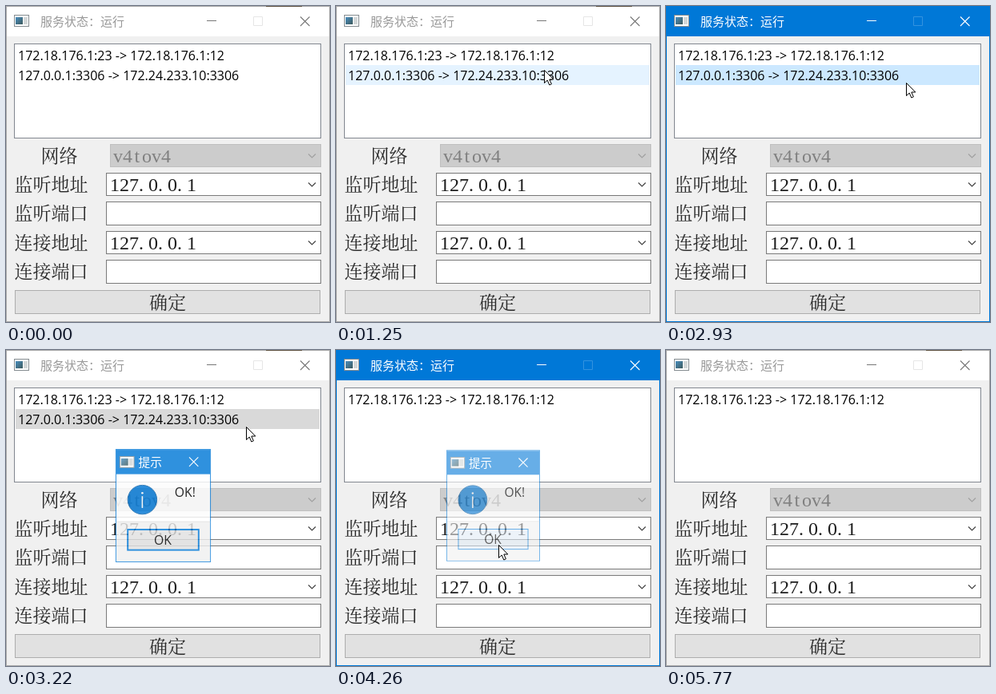
An HTML page for the animation above (5810 ms loop, 405 by 396 pixels).

```html
<!DOCTYPE html>
<html lang="zh-CN">
<head>
<meta charset="utf-8">
<title>服务状态</title>
<style>
  html, body { margin: 0; width: 100%; height: 100%; overflow: hidden; background: #f0f0f0; }
  svg { display: block; width: 100vw; height: 100vh; }
  text { white-space: pre; }
  .ui { font: 16px "Open Sans", "Noto Sans", "Noto Sans CJK SC", sans-serif; }
  .zh { font: 15px "Noto Sans CJK SC", "Noto Sans CJK", sans-serif; }
  .song { font: 300 23px "Noto Serif CJK SC", "Noto Sans CJK SC", "Noto Sans CJK", serif; fill: #2a2a2a; }
  .num { font: 24px "Liberation Serif", serif; }
  .mid { text-anchor: middle; }
  .line { fill: none; }
</style>
</head>
<body>
<svg id="stage" viewBox="0 0 405 396" lang="zh-CN"></svg>
<script>
const LOOP = 5810;
const BLUE = '#0078d7';
const stage = document.getElementById('stage');

// Markup helpers; box edges sit on pixel centres.
const box = (x, y, w, h, fill, stroke, extra = '') =>
  `<rect x="${x + .5}" y="${y + .5}" width="${w - 1}" height="${h - 1}" fill="${fill}" stroke="${stroke}" ${extra}/>`;
const fill = (x, y, w, h, color, extra = '') =>
  `<rect x="${x}" y="${y}" width="${w}" height="${h}" fill="${color}" ${extra}/>`;
const text = (x, y, cls, str, extra = '') =>
  `<text x="${x}" y="${y}" class="${cls}" ${extra}>${str.replace('>', '&gt;')}</text>`;
const cells = (x, y, str, color = '#1c1c1c') => {
  const xs = [...str].map((c, i) => x + 12 * i + (c === 't' ? 2.5 : 0));
  return text(xs.join(' '), y, 'num', str, `fill="${color}"`);
};
const chevron = (y, color) =>
  `<path class="line" d="M378 ${y - 2}l4.5 4.5l4.5 -4.5" stroke="${color}" stroke-width="1.2"/>`;
const cross = (x, y, extra = '') =>
  `<path class="line" d="M${x} ${y}l11.5 11.5m0 -11.5l-11.5 11.5" stroke-width="1.1" ${extra}/>`;
const appIcon = (x, y) => `<g transform="translate(${x} ${y})">
  ${box(0, 0, 19, 15, '#fff', '#858c90')}
  ${fill(2, 3, 9, 9, 'url(#pane)')}
  ${fill(12, 3, 5, 9, '#d3d7d8')}</g>`;

const controls = [
  { label: '监听地址', y: 209, h: 29, id: 'address1' },
  { label: '监听端口', y: 245, h: 30 },
  { label: '连接地址', y: 282, h: 29, id: 'address2' },
  { label: '连接端口', y: 318, h: 30 },
];
const combos = controls.filter(c => c.id);

stage.innerHTML = `
<defs><linearGradient id="pane" x2="1" y2="1">
  <stop stop-color="#4a8fc0"/><stop offset="1" stop-color="#3d5a5c"/>
</linearGradient></defs>
${fill(0, 0, 405, 396, '#f0f0f0')}
${fill(0, 0, 405, 38, '#fff', 'id="titleBar"')}
${box(0, 0, 405, 396, 'none', '#aaa', 'id="frame"')}
${fill(325, 0, 45, 1, '#5f5240', 'id="edgeStrip"')}
${appIcon(10, 11)}
${text(43, 25, 'zh', '服务状态：运行', 'id="title"')}
<path id="minimize" class="line" d="M251 18.5h12"/>
<path id="maximize" class="line" d="M309.500 13.500h11v11h-11z"/>
${cross(368, 13.5, 'id="close"')}

${box(10, 47, 384, 119, '#fff', '#828790')}
<g id="secondRow">
  ${fill(12, 74, 380, 25, '#fff', 'id="rowFill"')}
  ${text(15, 93, 'ui', '127.0.0.1:3306 -> 172.24.233.10:3306')}
</g>
${text(15, 68, 'ui', '172.18.176.1:23 -> 172.18.176.1:12')}

${text(43.5, 196, 'song', '网络')}
${box(130, 173, 264, 29, '#ccc', '#bfbfbf')}
${cells(134, 196, 'v4tov4', '#808080')}
${chevron(187.5, '#a0a0a0')}
${controls.map(c =>
  text(10.5, c.y + 23, 'song', c.label) +
  box(125, c.y, 269, c.h, '#fff', '#7a7a7a', c.id ? `id="${c.id}"` : '') +
  (c.id ? cells(130, c.y + 23, '127.0.0.1') + chevron(c.y + 14.5, '#444') : '')).join('')}
${box(11, 356, 382, 30, '#e1e1e1', '#adadad', 'id="confirm"')}
${text(202, 380, 'song mid', '确定')}

<g id="menu">
  ${box(258, 80, 92, 30, '#f2f2f2', '#ccc')}
  ${fill(261, 83, 85, 24, '#91c9f7', 'id="menuItem"')}
  ${text(295, 101, 'zh', '删除')}
</g>

<g id="dialog">
  ${box(136, 123, 121, 144, '#fff', BLUE)}
  ${fill(137, 124, 119, 31, BLUE)}
  ${fill(137, 215, 119, 51, '#f0f0f0')}
  ${fill(137, 215, 119, 1, '#dfdfdf')}
  ${appIcon(141, 132)}
  ${text(165, 145, 'zh', '提示', 'fill="#fff"')}
  ${cross(229.500, 133.500, 'stroke="#fff"')}
  <circle cx="170" cy="187.500" r="18.500" fill="${BLUE}" stroke="#0c64ad"/>
  <circle cx="170" cy="179" r="1.300" fill="#fff"/>
  <path d="M170 183v15" stroke="#fff" stroke-width="1.6"/>
  ${text(211, 184, 'ui', 'OK!')}
  ${box(151, 225, 91, 27, '#e1e1e1', BLUE, 'id="okButton"')}
  ${text(196, 245, 'ui mid', 'OK')}
</g>

<path id="cursor" d="M.5 .5v16l3.700 -3.500l2.600 6l2.600 -1.200l-2.600 -5.800h5z" fill="#fff" stroke="#000"/>`;

const el = Object.fromEntries([...stage.querySelectorAll('[id]')].map(e => [e.id, e]));
const set = (e, attrs) => Object.entries(attrs).forEach(([k, v]) => e.setAttribute(k, v));
const show = (e, on) => set(e, { display: on ? 'inline' : 'none' });
const clamp = v => Math.max(0, Math.min(1, v));
const span = (t, from, to) => clamp((t - from) / (to - from));
const smooth = p => p * p * (3 - 2 * p);
const within = (t, from, to) => t >= from && t < to;
const mix = (a, b, p) => `rgb(${a.map((v, i) => Math.round(v + (b[i] - v) * p))})`;

// Pointer waypoints: time, x, y.
const route = [
  [120, 282, 362], [680, 270, 238], [1250, 260, 80], [1740, 260, 80],
  [2060, 289, 96], [2150, 298, 96], [2329, 298, 96], [2330, 300, 96],
  [3470, 300, 96], [4010, 203, 243], [4110, 203, 244], [4560, 204, 244],
  [4660, 212, 250], [4950, 274, 379], [5010, 284, 400],
];
const EASED_LEG = 3470;

function pointer(t) {
  const i = route.findIndex(p => p[0] > t);
  if (i < 1) return null;
  const [t0, x0, y0] = route[i - 1], [t1, x1, y1] = route[i];
  let p = span(t, t0, t1);
  if (t0 === EASED_LEG) p = smooth(p);
  return { x: x0 + (x1 - x0) * p, y: y0 + (y1 - y0) * p };
}

// Weighs recent pointer samples over a control, so hovering fades in and out.
function hover(t, top, height, samples) {
  let weight = 0;
  for (let past = 0; past < 500; past += 25) {
    const time = t - past, p = pointer(time);
    if (p && !within(time, 3080, 4250) && p.y >= top && p.y < top + height) weight += 1 - past / 500;
  }
  return clamp(weight / samples);
}

function drawWindow(t) {
  const active = within(t, 1350, 3080) || within(t, 4200, 5770);
  const ink = active ? '#fff' : '#777';
  set(el.titleBar, { fill: active ? BLUE : '#fff' });
  set(el.frame, { stroke: active ? BLUE : '#aaa' });
  set(el.title, { fill: active ? '#fff' : '#999' });
  set(el.minimize, { stroke: ink });
  set(el.close, { stroke: ink });
  set(el.maximize, { stroke: active ? '#3393df' : '#e6e6e6' });
  show(el.edgeStrip, !active);

  show(el.secondRow, t < 4250);
  set(el.rowFill, { fill: t < 1170 ? '#fff' : t < 1350 ? '#e5f3ff' : t < 3080 ? '#cce8ff' : '#d9d9d9' });

  for (const c of combos)
    set(el[c.id], { stroke: mix([122, 122, 122], [23, 23, 23], hover(t, c.y, c.h, 1.5)) });
  const glow = hover(t, 356, 30, 6);
  set(el.confirm, {
    fill: mix([225, 225, 225], [224, 232, 238], glow),
    stroke: mix([173, 173, 173], [80, 140, 190], glow),
  });
}

function drawPopups(t) {
  show(el.menu, within(t, 1660, 2930));
  set(el.menu, { opacity: .4 + .6 * span(t, 1660, 1760) });
  show(el.menuItem, t >= 1800);

  const opening = 1 - (1 - span(t, 3080, 3330)) ** 2;
  const shown = opening * (1 - span(t, 4200, 4350));
  const scale = .92 + .08 * shown;
  show(el.dialog, shown > 0);
  set(el.dialog, {
    opacity: shown,
    transform: `translate(196.5 195) scale(${scale}) translate(-196.5 -195)`,
  });
  const over = t >= 3900, pressed = within(t, 4110, 4160);
  set(el.okButton, {
    fill: pressed ? '#cce4f7' : over ? '#e2ebf5' : '#e1e1e1',
    'stroke-width': over ? 1 : 2,
  });
}

function draw(t) {
  drawWindow(t);
  drawPopups(t);
  const p = pointer(t);
  show(el.cursor, p);
  if (p) set(el.cursor, { transform: `translate(${Math.round(p.x)} ${Math.round(p.y)})` });
}

const start = performance.now();
function tick(now) {
  draw(Math.max(0, now - start) % LOOP);
  requestAnimationFrame(tick);
}
draw(0);
requestAnimationFrame(tick);
</script>
</body>
</html>
```
